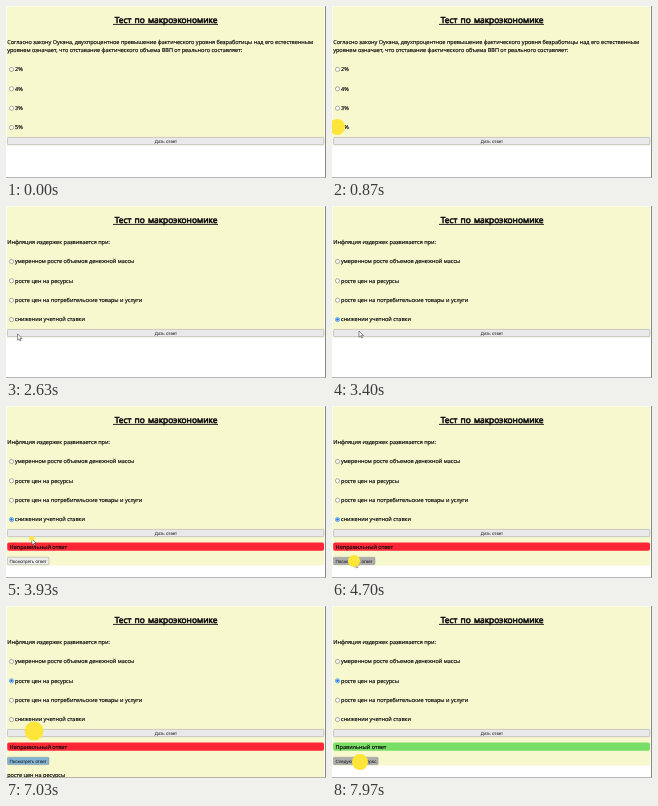
An HTML page for the animation above (8 s loop, 320x172 px).

```html
<!DOCTYPE html>
<html lang="ru">
<head>
<meta charset="utf-8">
<title>Тест</title>
<style>
  html, body { margin: 0; width: 100%; height: 100%; overflow: hidden; background: #fff; }
  svg { display: block; width: 100vw; height: 100vh; }
  text { text-rendering: geometricPrecision; fill: #111; }
  .body { font: 5.53px "Open Sans", "Noto Sans", sans-serif; stroke: #111; stroke-width: .2px; }
  .title { font: 8.4px "Open Sans", "Noto Sans", sans-serif; stroke: #111; stroke-width: .6px; text-anchor: middle; word-spacing: 1px; }
  .label { font: 4.5px "Liberation Sans", Arial, sans-serif; }
  .mid { text-anchor: middle; }
</style>
</head>
<body>
<svg viewBox="0 0 320 172" preserveAspectRatio="none">
  <g id="page"></g>
  <path id="cursor" d="M0 0V6.2L1.5 4.9L2.5 7L3.5 6.5L2.5 4.5H4.4Z" fill="#fff" stroke="#222" stroke-width=".5"/>
  <circle id="ring" fill="#fde53a"/>
</svg>
<script>
const LOOP = 8000;
const questions = [
  {
    lines: [
      'Согласно закону Оукэна, двухпроцентное превышение фактического уровня безработицы над его естественным',
      'уровнем означает, что отставание фактического объема ВВП от реального составляет:'
    ],
    options: ['2%', '4%', '3%', '5%']
  },
  {
    lines: ['Инфляция издержек развивается при:'],
    options: ['умеренном росте объемов денежной массы', 'росте цен на ресурсы',
      'росте цен на потребительские товары и услуги', 'снижении учетной ставки']
  }
];

// Quiz state changes: each entry is merged over the previous ones.
const states = [
  [0, { question: 0, picked: -1, result: '', answer: '', focused: false }],
  [980, { picked: 3 }],
  [1400, { result: 'right' }],
  [2400, { question: 1, picked: -1, result: '' }],
  [2950, { picked: 3 }],
  [3760, { result: 'wrong' }],
  [4850, { answer: 'росте цен на ресурсы' }],
  [5250, { focused: true }],
  [6200, { picked: 1 }],
  [7100, { result: 'right', answer: '', focused: false }]
];

// Pointer stops: arrival, departure, x, y.
const stops = [
  [0, 100, 70, 178], [700, 930, 5, 121], [1200, 1480, 30, 134], [1700, 1850, -8, 150],
  [2100, 2430, 24, 161], [2750, 3040, 6, 113], [3350, 3800, 27, 125], [4200, 5200, 22, 155],
  [5800, 6360, 6, 75], [6700, 7250, 28, 125], [7700, 8000, 28, 156]
];
const clicks = [767, 1230, 2150, 2790, 3560, 4626, 5930, 6900, 7867];
const CLICK_TIME = 400, CLICK_RADIUS = 11;

const text = (x, y, str, cls = 'body') => `<text x="${x}" y="${y}" class="${cls}">${str}</text>`;
const rect = (x, y, w, h, fill, extra = '') =>
  `<rect x="${x}" y="${y}" width="${w}" height="${h}" fill="${fill}" ${extra}/>`;
const button = (y, w, h, fill) => rect(1.4, y, w, h, fill, 'rx="1" stroke="#8c8c8c" stroke-width=".4"');

function radio(y, on) {
  const color = on ? '#0b72e0' : '#767676';
  return `<circle cx="5.5" cy="${y}" r="2.1" fill="#fff" stroke="${color}" stroke-width=".6"/>` +
    (on ? `<circle cx="5.5" cy="${y}" r="1.25" fill="${color}"/>` : '');
}

function drawPage(s, hovered) {
  const { lines, options } = questions[s.question];
  const shift = (lines.length - 1) * 8;
  const bottom = s.answer ? 172 : s.result ? 159.5 + shift : 131.4 + shift;
  let out = rect(.7, .5, 317.7, bottom - .5, '#f8f8cf');

  out += text(160, 16.7, 'Тест по макроэкономике', 'title') + rect(107, 17.9, 105, .9, '#111');
  lines.forEach((line, i) => out += text(1.2, 38 + i * 8, line));
  options.forEach((option, i) => {
    const y = 55.5 + shift + i * 19.35;
    out += radio(y, s.picked === i) + text(9, y + 1.8, option);
  });
  out += button(123.4 + shift, 316.4, 7.3, '#e9e9ec') +
    text(160, 128.6 + shift, 'Дать ответ', 'label mid');

  if (s.result) {
    const right = s.result === 'right';
    const fill = hovered ? '#adadad' : s.focused ? '#82b3d3' : '#ececec';
    out += rect(1.2, 136.5 + shift, 316.8, 8.3, right ? '#78de65' : '#ff2636', 'rx="1.8"') +
      text(3.6, 142.6 + shift, right ? 'Правильный ответ' : 'Неправильный ответ') +
      button(151.2 + shift, right ? 44.8 : 41.6, 7.5, fill) +
      text(3.4, 156.6 + shift, right ? 'Следующий вопрос' : 'Посмотреть ответ', 'label');
  }
  if (s.answer) out += text(1.2, 170.6, s.answer);
  return out + rect(319, 0, 1, 172, '#8a8a8a') + rect(0, 171.3, 320, .7, '#999');
}

function pointerAt(t) {
  const i = stops.findLastIndex(stop => stop[0] <= t);
  const [, leave, x, y] = stops[i];
  const next = stops[i + 1];
  if (t <= leave || !next) return [x, y];
  const p = (t - leave) / (next[0] - leave);
  const e = p * p * (3 - 2 * p);
  return [x + (next[2] - x) * e, y + (next[3] - y) * e];
}

const page = document.getElementById('page');
const cursor = document.getElementById('cursor');
const ring = document.getElementById('ring');
const start = performance.now();
let shown = '';

function render() {
  const t = (performance.now() - start) % LOOP;
  const state = Object.assign({}, ...states.filter(([at]) => at <= t).map(([, change]) => change));
  const [x, y] = pointerAt(t);
  const buttonTop = state.question ? 151 : 159;
  const hovered = x > 1 && x < 46 && y > buttonTop && y < buttonTop + 8;

  const html = drawPage(state, hovered);
  if (html !== shown) page.innerHTML = shown = html;

  cursor.setAttribute('transform', `translate(${x} ${y})`);
  const click = clicks.find(at => t >= at && t < at + CLICK_TIME);
  const radius = click === undefined ? 0 : CLICK_RADIUS * Math.sin(Math.PI * (t - click) / CLICK_TIME);
  ring.setAttribute('cx', x);
  ring.setAttribute('cy', y);
  ring.setAttribute('r', radius);
  requestAnimationFrame(render);
}
render();
</script>
</body>
</html>
```
